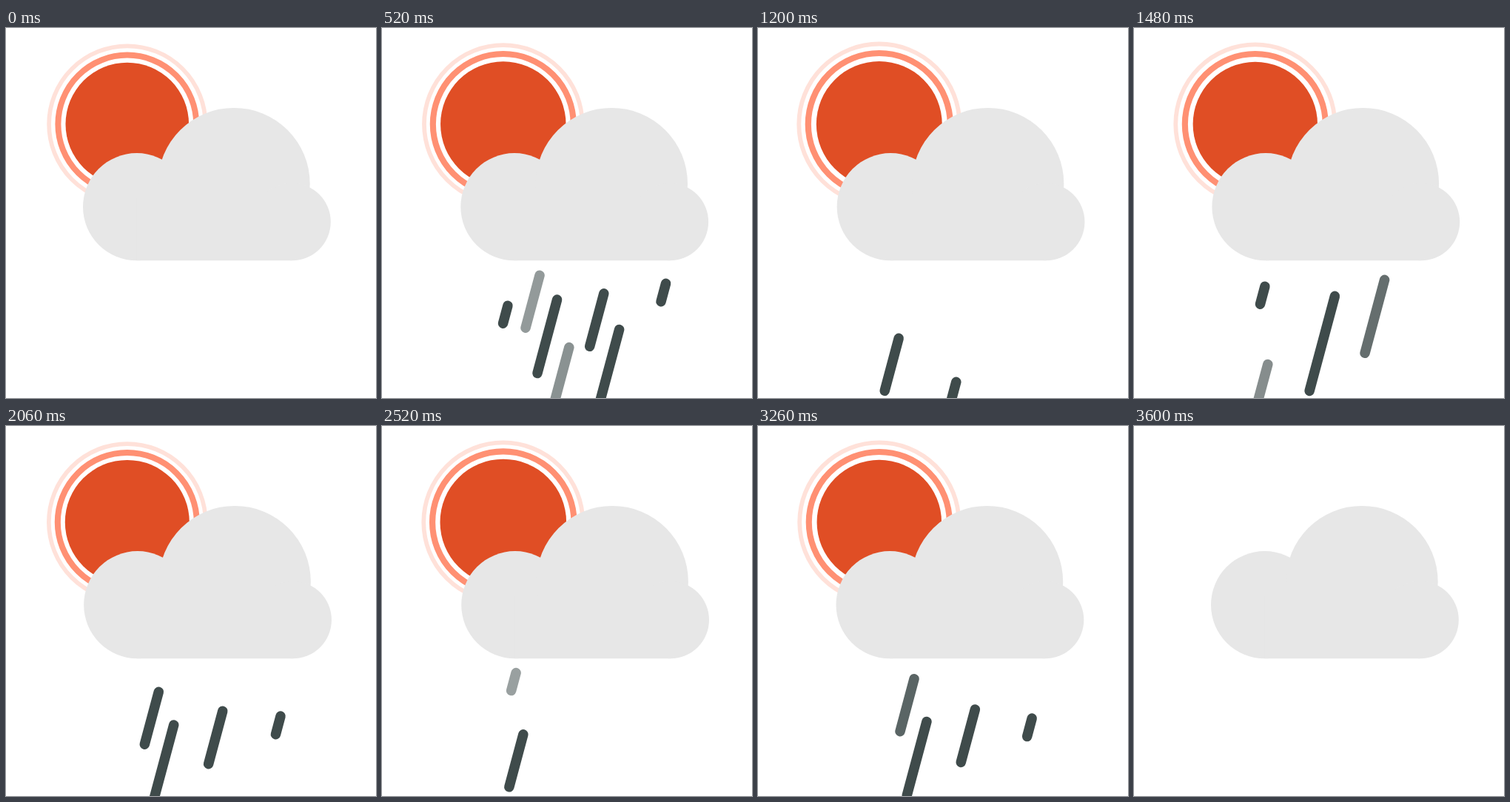
An HTML page that plays this animation: 500 px wide and 500 px high, repeating every 3620 ms.

```html
<!DOCTYPE html>
<html lang="en">
<head>
<meta charset="utf-8">
<title>Sun, cloud and rain</title>
<style>
  html, body { margin: 0; width: 100%; height: 100%; overflow: hidden; background: #fff; }
  svg { display: block; width: 100vw; height: 100vh; }
  #sun circle { transform-origin: 163.8px 130px; }
  #rain { stroke: #3f4b4b; stroke-width: 13.5; stroke-linecap: round; }
</style>
</head>
<body>
<svg viewBox="0 0 500 500">
  <g id="sun" fill="none">
    <circle cx="163.8" cy="130" r="105.7" stroke="#ffe1d9" stroke-width="5.7"/>
    <circle cx="163.8" cy="130" r="93.4" stroke="#ff9073" stroke-width="8"/>
    <circle cx="163.8" cy="130" r="83.3" fill="#e04e25"/>
  </g>
  <g id="rain"></g>
  <g id="cloud" fill="#e7e7e7">
    <circle cx="176.6" cy="241.7" r="72.6"/>
    <circle cx="308" cy="210.6" r="102.7"/>
    <circle cx="386.5" cy="262" r="52.3"/>
    <path d="M176.6 230H386.5V314.3H176.6z"/>
  </g>
</svg>
<script>
const LOOP = 3620, RAIN_END = 3600, SWING = 900, SLOPE = 0.268;
const sun = document.getElementById('sun');
const rain = document.getElementById('rain');
const cloud = document.getElementById('cloud');

const rings = [
  { delay: 200, grow: 0.03 },
  { delay: 100, grow: 0.036 },
  { delay: 0, grow: 0.03 }
];

// lane: x where the drop's path meets y = 0; start and end: visible part of the first period
const drops = [
  { lane: 270.5, len: 24, period: 1161, start: 94, end: 860, y: 320, fall: 99 },
  { lane: 302.6, len: 71, period: 1340, start: 410, end: 1600, y: 320.3, fall: 149 },
  { lane: 335, len: 99.5, period: 1237, start: 260, end: 1180, y: 335.3, fall: 112, fadeIn: 180 },
  { lane: 368.5, len: 128, period: 1213, start: 113, end: 636, y: 320, fall: 143, fadeIn: 110 },
  { lane: 396, len: 71.5, period: 1214, start: 470, end: 1400, y: 358.5, fall: 207, fadeIn: 36, power: 2.27 },
  { lane: 429.8, len: 99, period: 1237, start: 160, end: 730, y: 320, fall: 138, fadeIn: 105 },
  { lane: 476.1, len: 24.5, period: 1177, start: 345, end: 1150, y: 322.5, fall: 104, fadeIn: 150 }
];
for (const drop of drops) {
  drop.line = document.createElementNS('http://www.w3.org/2000/svg', 'line');
  rain.append(drop.line);
}

const clamp = v => Math.min(1, Math.max(0, v));
const swing = t => t < 0 ? 0 : 1 - Math.abs(1 - t / SWING % 2);

function drawDrop({ line, lane, len, period, start, end, y, fall, fadeIn = 200, power = 1 }, t) {
  const age = (t - start) % period, life = end - start;
  const visible = t >= start && age < life;
  line.style.display = visible ? '' : 'none';
  if (!visible) return;
  const top = y + fall * (age / life) ** power, bottom = top + len;
  line.setAttribute('x1', lane - SLOPE * top);
  line.setAttribute('y1', top);
  line.setAttribute('x2', lane - SLOPE * bottom);
  line.setAttribute('y2', bottom);
  line.style.opacity = Math.min(clamp(age / fadeIn), clamp((life - age) / 190));
}

function draw(t) {
  sun.style.display = rain.style.display = t < RAIN_END ? '' : 'none';
  rings.forEach(({ delay, grow }, i) => {
    sun.children[i].style.transform = `scale(${1 + grow * swing(t - delay)})`;
  });
  cloud.setAttribute('transform', `translate(${4 * swing(t)} 0)`);
  drops.forEach(drop => drawDrop(drop, t));
}

const began = performance.now();
function tick() {
  draw((performance.now() - began) % LOOP);
  requestAnimationFrame(tick);
}
tick();
</script>
</body>
</html>
```
